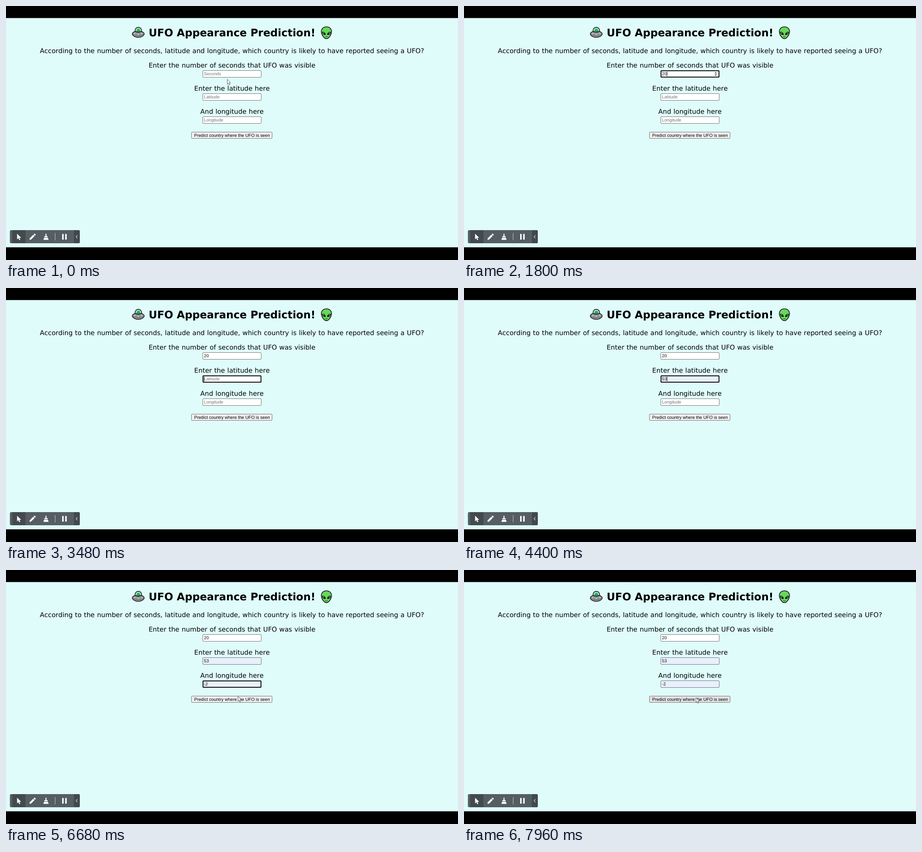
An HTML page for the animation above (8 s loop, 998x561 px).

```html
<!DOCTYPE html>
<html lang="en">
<head>
<meta charset="utf-8">
<title>UFO Appearance Prediction</title>
<style>
  html, body { margin: 0; width: 100%; height: 100%; overflow: hidden; background: #000; }
  svg { display: block; width: 100vw; height: 100vh; text-rendering: geometricPrecision; font-kerning: none; }
  .copy { font: 14.5px "DejaVu Sans", sans-serif; font-kerning: none; word-spacing: .53px; text-anchor: middle; }
  .title { font: bold 23.05px "DejaVu Sans", sans-serif; font-kerning: none; }
  .ui { font: 9.74px "Liberation Sans", Arial, sans-serif; }
  .box { fill: #fff; stroke: #767676; }
  .filled .box { fill: #e8f0fe; }
  .ring { fill: none; stroke: #101010; stroke-width: 2; }
  .value { fill: #111; }
  .empty .value { fill: #757575; }
  .spin { fill: #444; }
  .ring, .spin { visibility: hidden; }
  .focus .ring, .focus .spin { visibility: visible; }
  .ink { stroke: #111; stroke-width: 1.5; stroke-linejoin: round; }
</style>
</head>
<body>
<svg viewBox="0 0 998 561" preserveAspectRatio="none">
  <rect width="998" height="561"/>
  <rect y="26.6" width="998" height="506.4" fill="#dffcfb"/>

  <!-- saucer -->
  <g class="ink">
    <path d="M285 57V54a7.2 7 0 0 1 14.4 0V57Z" fill="#a9d5e2"/>
    <path d="M288.3 58Q287.6 50.5 292.3 50.5T296.2 58Z" fill="#22b038" stroke="none"/>
    <path d="M285 56Q279 58.5 278.8 61.5C279 66 286 69.2 292 69.2S305 66 305.2 61.5Q305 58.5 299 56Q292 60 285 56Z" fill="#95999d"/>
    <path d="M280.5 62.5Q292 68.5 303.5 62.5" fill="none" stroke="#54595d" stroke-width="1.2"/>
    <g fill="#f1f3e8" stroke="none">
      <circle cx="284" cy="61.3" r="1.1"/><circle cx="292" cy="63" r="1.1"/><circle cx="300" cy="61.3" r="1.1"/>
    </g>
  </g>
  <text class="title" x="315" y="67">UFO Appearance Prediction!</text>
  <!-- alien -->
  <g class="ink">
    <path d="M707.5 46C700.5 46 696.2 50.6 696.2 56.6C696.2 63.5 702.5 72.2 707.5 72.2S718.8 63.5 718.8 56.6C718.8 50.6 714.5 46 707.5 46Z" fill="#66d85c"/>
    <path d="M698.4 57.3Q704.8 57 705.6 63.4Q698.8 64 698.4 57.3ZM716.6 57.3Q710.2 57 709.4 63.4Q716.2 64 716.6 57.3Z" fill="#111" stroke-width=".8"/>
    <path d="M705 67.6Q707.5 69.2 710 67.6" fill="none" stroke-width="1"/>
    <g fill="#fff" stroke="none"><circle cx="701" cy="59.4" r="1"/><circle cx="713.8" cy="59.4" r="1"/></g>
  </g>

  <g class="copy">
    <text x="499" y="104">According to the number of seconds, latitude and longitude, which country is likely to have reported seeing a UFO?</text>
    <text x="499" y="136">Enter the number of seconds that UFO was visible</text>
    <text x="499" y="187">Enter the latitude here</text>
    <text x="499" y="238">And longitude here</text>
  </g>

  <g class="ui">
    <g id="fields"></g>
    <rect id="button" x="409.5" y="278.5" width="178" height="14" rx="1.6" stroke="#767676"/>
    <text x="499" y="289" text-anchor="middle">Predict country where the UFO is seen</text>
    <rect id="caret" width="1" height="10" fill="#111"/>
  </g>

  <!-- recorder toolbar -->
  <rect x="8.6" y="495" width="154.4" height="29" rx="3" fill="#555e63"/>
  <path d="M14 495H43V524H14Z" fill="#434a4e"/>
  <path d="M150 495H160Q163 495 163 498V521Q163 524 160 524H150Z" fill="#42494d"/>
  <g fill="#fff">
    <path d="M24.5 503V515.4L27.3 512.8 29.4 517.2 31.5 516.2 29.5 512H33.5Z"/>
    <path d="M52 516.3V513.4L60.1 505.3 63 508.2 54.9 516.3ZM60.9 504.5L62.4 503Q63.1 502.5 63.8 503L65.3 504.5Q65.8 505.2 65.3 505.9L63.8 507.4Z"/>
    <path d="M87.2 503H89.4V508.4H92V511H84.6V508.4H87.2ZM84.2 512H92.4L94.2 516.6H82.4Z"/>
    <path d="M124 503.5H127.3V516H124ZM130.7 503.5H134V516H130.7Z"/>
    <path d="M108 501.5H109V517.5H108Z" opacity=".65"/>
  </g>
  <path d="M157.6 506.3L154.6 509.6 157.6 512.9" fill="none" stroke="#dfe3e5" stroke-width="1.1"/>

  <path id="pointer" d="M0 0V10.7L2.4 8.5 4.1 12.4 5.8 11.6 4.2 7.8H7.4Z" fill="#fff" stroke="#4a4f52" stroke-width=".9" stroke-linejoin="round"/>
</svg>
<script>
const LOOP = 8000, BLINK = 530;
const byId = id => document.getElementById(id);

const fields = [
  { hint: 'Seconds', focus: 500, blur: 3000, keys: [[1350, '2'], [1650, '20']], spinner: true },
  { hint: 'Latitude', focus: 3000, blur: 4800, keys: [[3650, '5'], [3950, '53']], fill: 3950 },
  { hint: 'Longitude', focus: 4800, blur: 7250, keys: [[4850, '-'], [5000, '-2']], fill: 5000 }
];

// The pointer shows from `show` to `hide` and travels between `start` and `end`.
const moves = [
  { show: 0, start: 120, end: 440, hide: 520, from: [488.7, 162], to: [491, 148] },
  { show: 2420, start: 2420, end: 2780, hide: 3040, from: [492, 152], to: [504.7, 196] },
  { show: 4480, start: 4480, end: 4720, hide: 4840, from: [505, 198], to: [508, 246] },
  { show: 6000, start: 6000, end: 6480, hide: 6760, from: [508, 249], to: [512.2, 279] },
  { show: 6760, start: 6760, end: 7050, hide: LOOP, from: [512.2, 279], to: [512.2, 282] }
];

fields.forEach((field, i) => {
  const y = 142 + 51 * i;
  const group = document.createElementNS('http://www.w3.org/2000/svg', 'g');
  group.innerHTML = `<rect class="box" x="434.5" y="${y + .5}" width="129" height="15" rx="1.6"/>
    <rect class="ring" x="435" y="${y + 1}" width="128" height="14" rx="1"/>
    <text class="value" x="437" y="${y + 11.3}"></text>` + (field.spinner
    ? `<path class="spin" d="M553 ${y + 6.8}h5.4l-2.7 -3zM553 ${y + 9.2}h5.4l-2.7 3z"/>` : '');
  byId('fields').append(group);
  Object.assign(field, { y, group, label: group.querySelector('text') });
});

function drawField(field, t) {
  const typed = field.keys.filter(([at]) => t >= at).pop();
  const focused = t >= field.focus && t < field.blur;
  const { group, label } = field;
  group.classList.toggle('focus', focused);
  group.classList.toggle('empty', !typed);
  group.classList.toggle('filled', t >= field.fill);
  const text = typed ? typed[1] : field.hint;
  if (label.textContent !== text) label.textContent = text;
  if (!focused) return;
  const since = t - (typed ? typed[0] : field.focus);
  const caret = byId('caret');
  caret.setAttribute('x', 437 + (typed ? label.getComputedTextLength() : 0));
  caret.setAttribute('y', field.y + 3);
  caret.style.visibility = since % (2 * BLINK) < BLINK ? 'visible' : 'hidden';
}

function drawPointer(t) {
  const move = moves.find(({ show, hide }) => t >= show && t < hide);
  const pointer = byId('pointer');
  pointer.style.visibility = move ? 'visible' : 'hidden';
  if (!move) return;
  const { start, end, from, to } = move;
  const p = Math.min(1, Math.max(0, (t - start) / (end - start)));
  const ease = p * p * (3 - 2 * p);
  const [x, y] = from.map((v, axis) => v + (to[axis] - v) * ease);
  pointer.setAttribute('transform', `translate(${x} ${y})`);
}

function draw(now) {
  const t = now % LOOP;
  byId('caret').style.visibility = 'hidden';
  fields.forEach(field => drawField(field, t));
  byId('button').setAttribute('fill', t >= 7050 ? '#e2e2e2' : '#efefef');
  drawPointer(t);
}

const began = performance.now();
function tick() {
  draw(performance.now() - began);
  requestAnimationFrame(tick);
}
tick();
</script>
</body>
</html>
```
